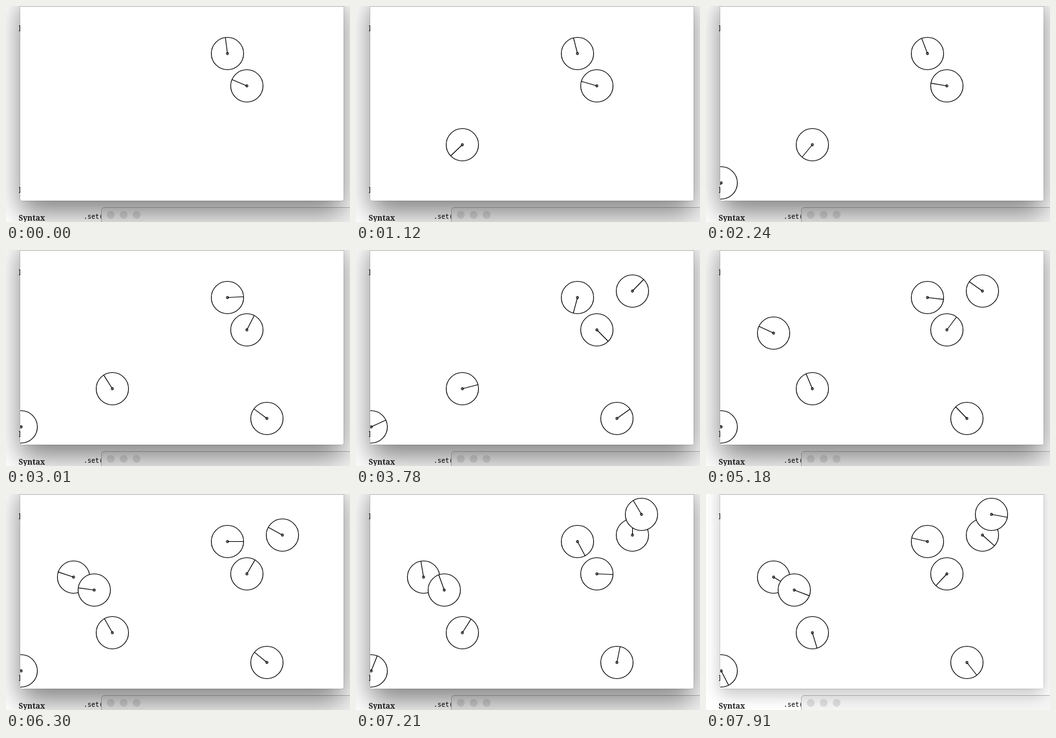
These frames come from a looping animation (532x334 px, 7980 ms). An HTML page with a canvas:

```html
<!DOCTYPE html>
<html lang="en">
<head>
<meta charset="utf-8">
<title>Spinning dials</title>
<style>
  html, body { margin: 0; width: 100%; height: 100%; overflow: hidden; background: #fff; }
  #stage { position: relative; width: 532px; height: 334px; overflow: hidden; color: #222; }
  #stage > * { position: absolute; white-space: nowrap; }
  .label { left: 19.5px; font: bold 11.8px/16px "Noto Serif", serif; }
  .code { left: 120px; top: 318px; font: 10px/16px "DejaVu Sans Mono", monospace; color: #000; }
  #back { left: 147px; top: 311px; width: 420px; height: 60px; box-sizing: border-box;
    border: 1px solid #bcbcbc; border-radius: 5px; background: #f5f5f5; }
  #back i { float: left; margin: 5px 0 0 8px; width: 12px; height: 12px; border-radius: 50%; background: #dcdcdc; }
  #front { left: 22px; top: -22px; width: 500px; height: 323px; border-radius: 4px; background: #fff;
    box-shadow: 0 0 0 .5px rgba(0,0,0,.2), 0 19px 44px rgba(0,0,0,.5); overflow: hidden; }
  #front.idle { box-shadow: 0 0 0 .5px rgba(0,0,0,.2), 0 9px 26px rgba(0,0,0,.24); }
  canvas { position: absolute; left: 0; top: 22px; }
  #edge { left: 22px; top: 0; width: 500px; height: 1px; background: #b4b4b4; }
</style>
</head>
<body>
<div id="stage">
  <div class="label" style="top:26px">Description</div>
  <div class="label" style="top:276px">Parameters</div>
  <div class="label" style="top:319px">Syntax</div>
  <div class="code">.set(</div>
  <div id="back"><i></i><i></i><i></i></div>
  <div id="front"><canvas width="500" height="301"></canvas></div>
  <div id="edge"></div>
</div>
<script>
const STEP = 70, LOOP = 7980, IDLE_AT = 7770;
const SPIN = -0.4; // radians per step
const RADIUS = 25;
// Centres, in the order the dials are added
const centres = [
  [342.5, 73.5], [372.5, 123.5], [164.5, 214.5], [23.5, 273.5], [403.5, 260.5],
  [427.5, 63.5], [104.5, 128.5], [136.5, 148.5], [441.5, 31.5]
];
const EARLY = 2; // dials already turning when the loop begins
const front = document.getElementById('front');
const ctx = document.querySelector('canvas').getContext('2d');
ctx.translate(-22, 0);
ctx.fillStyle = '#fff';
ctx.strokeStyle = '#000';
ctx.lineWidth = 1.15;

// Dials are added at an even pace, a little faster before the loop begins
function startStep(index) {
  const k = index - EARLY;
  return 6.24 + k * (k < 0 ? 13.1 : 15.25);
}

function disc(x, y, r) {
  ctx.beginPath();
  ctx.arc(x, y, r, 0, Math.PI * 2);
  ctx.fill();
  ctx.stroke();
}

function drawDial(x, y, angle) {
  disc(x, y, RADIUS);
  disc(x, y, 1.6);
  ctx.beginPath();
  ctx.moveTo(x, y);
  ctx.lineTo(x + RADIUS * Math.cos(angle), y + RADIUS * Math.sin(angle));
  ctx.stroke();
}

function frame() {
  const time = performance.now() % LOOP;
  const step = Math.floor(time / STEP);
  front.className = time >= IDLE_AT ? 'idle' : '';
  ctx.fillRect(22, 0, 500, 301);
  centres.forEach(([x, y], i) => {
    const age = step - startStep(i);
    if (age >= 0) drawDial(x, y, SPIN * age);
  });
  requestAnimationFrame(frame);
}
frame();
</script>
</body>
</html>
```
